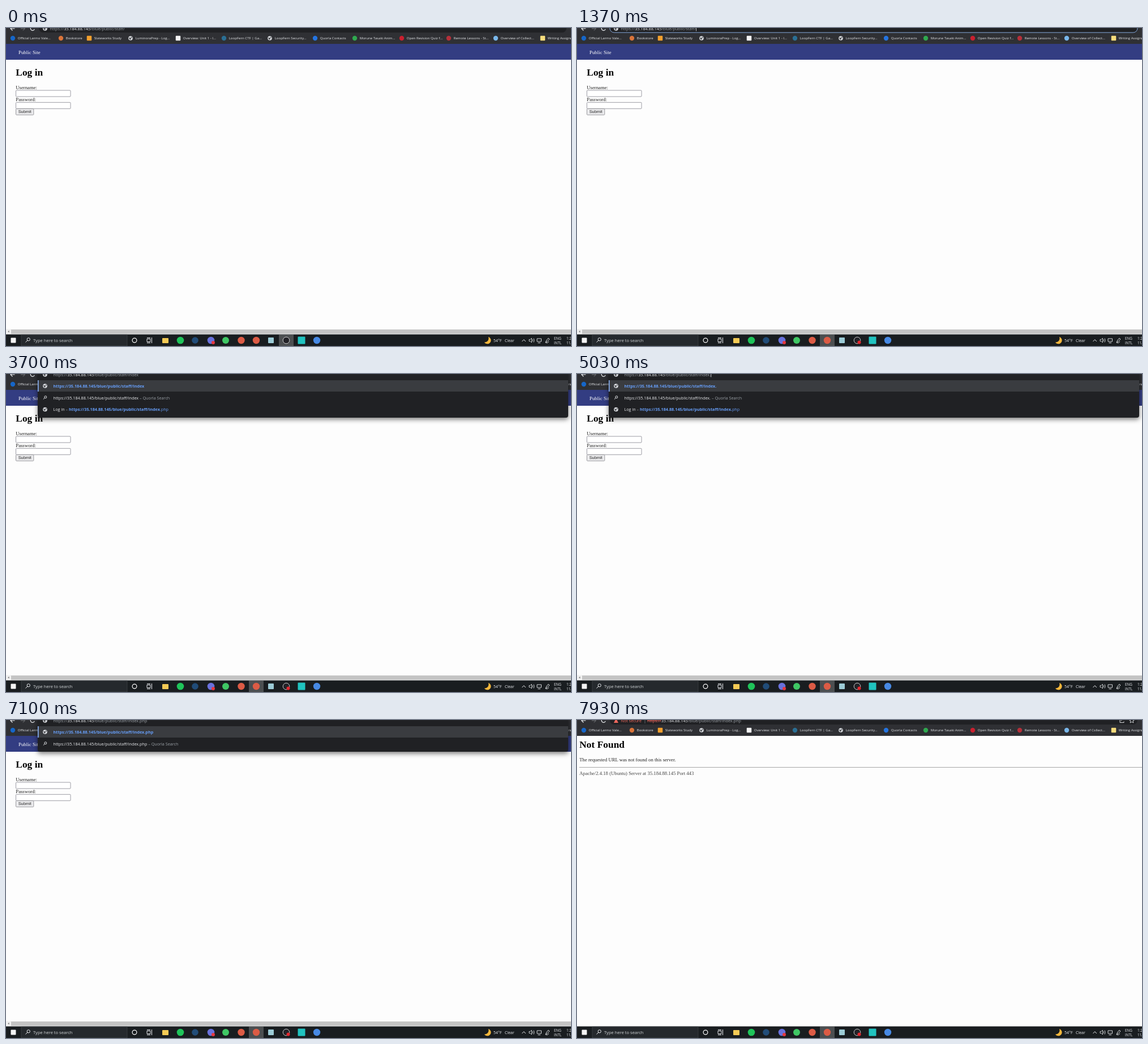
An HTML page that plays this animation: 998x561 px, repeating every 8 s.

```html
<!DOCTYPE html>
<html lang="en">
<head>
<meta charset="utf-8">
<title>Log in</title>
<style>
  html, body { margin: 0; width: 100%; height: 100%; overflow: hidden; background: #fdfdfd; }
  svg { display: block; }
  text { white-space: pre; font: 7.23px "Open Sans", "Noto Sans", sans-serif; fill: #e8eaed; }
  .mark text { font-size: 6.1px; }
  .task text { font-size: 7px; }
  .page text { font: 8.7px "Liberation Serif", Times, serif; fill: #222; }
  .page .head { font-size: 17.4px; font-weight: bold; fill: #000; }
  .grey { fill: #9aa0a6; }
  .blue { fill: #669df6; font-weight: bold; }
  .red { fill: #ee675c; }
  .line { fill: none; stroke: #e8eaed; }
</style>
</head>
<body>
<svg id="stage" width="998" height="561" viewBox="0 0 998 561"></svg>
<script>
const LOOP = 8000;
const HOST = '35.184.88.145', PATH = '/blue/public/staff/';
const ADDRESS = 'https://' + HOST + PATH;

// time at which each further character of the file name appears
const KEYS = [[1900, 'i'], [2400, 'n'], [2630, 'd'], [2900, 'e'], [3130, 'x'],
              [5000, '.'], [5770, 'p'], [6500, 'h'], [6600, 'p']];
const CARET_ON = [[870, 1630], [1900, 3700], [4200, 4800], [5000, 5570], [5770, 6300], [6500, 7000]];

const rect = (x, y, w, h, fill, more = '') =>
  `<rect x="${x}" y="${y}" width="${w}" height="${h}" fill="${fill}" ${more}/>`;
const disc = (x, y, r, fill, more = '') => `<circle cx="${x}" cy="${y}" r="${r}" fill="${fill}" ${more}/>`;
const tile = (x, y, size, fill) => rect(x - size / 2, y - size / 2, size, size, fill, 'rx="1"');
const text = (x, y, content, more = '') => `<text x="${x}" y="${y}" ${more}>${content}</text>`;
const span = (kind, content) => `<tspan class="${kind}">${content}</tspan>`;
const path = (d, more = '') => `<path class="line" d="${d}" ${more}/>`;
const group = (id, content, kind = '') => `<g id="${id}" class="${kind}">${content}</g>`;

const globe = (x, y) => disc(x, y, 3.8, '#dadce0') +
  `<path d="M${x - 3} ${y - 1}l3 0l1 2l-2 2zM${x + 1} ${y - 3}l2 2l-2 1z" fill="#4a4c50"/>`;
const lens = (x, y, s) =>
  path(`M${x - s} ${y + s}l${s} ${-s}`) + disc(x + s * .5, y - s * .5, s * .75, 'none', 'stroke="#e8eaed"');

function bookmarks() {
  const round = color => x => disc(x, 18, 4.2, color);
  const square = color => x => tile(x, 18, 8.5, color);
  const world = x => globe(x, 18);
  return [
    [12, 'Official Larmo Vale...', round('#1666c8')],
    [97, 'Bookstore', round('#d9743a')],
    [147, 'Slateworks Study', square('#f2a02e')],
    [220, 'LuminoraPrep - Log...', world],
    [304, 'Overview: Unit 1 - I...', square('#f4f4f4')],
    [385, 'LoopFern CTF | Ga...', round('#2a6f94')],
    [466, 'LoopFern Security...', world],
    [546, 'Quorla Contacts', round('#2474e0')],
    [616, 'Morune Tasaki Anim...', round('#2fa84f')],
    [699, 'Open Revision Quiz f...', round('#c9202f')],
    [782, 'Remote Lessons - St...', round('#b5303a')],
    [865, 'Overview of Collect...', round('#79b7ea')],
    [948, 'Writing Assignments', square('#f6dc7c')]
  ].map(([x, label, icon]) => icon(x) + text(x + 8.7, 20.3, label)).join('');
}

function toolbar() {
  return rect(0, 0, 998, 28, '#2f3034') +
    path('M15.500 1H8.500M11.500 -3L8 1L11.500 4.500', 'stroke-width="1.2"') +
    path('M26 1H33M30 -3L33.500 1L30 4.500', 'style="stroke:#77797d"') +
    path('M50 -1A3.600 3.600 0 1 0 50.300 2', 'stroke-width="1.2"') +
    rect(58, -7, 932, 15, '#202124', 'id="omnibox" rx="7.5"') +
    group('marks', bookmarks(), 'mark');
}

function loginPage() {
  const field = y => rect(17.5, y, 96.5, 11, '#fff', 'rx="1" stroke="#85858f" stroke-width=".8"');
  return rect(0, 28, 998, 28, '#333d82') +
    text(22, 46, 'Public Site', 'style="fill:#fff;font-size:8.9px"') +
    text(17.3, 83.5, 'Log in', 'class="head"') +
    text(17.3, 107.5, 'Username:') + field(110) +
    text(17.3, 128.8, 'Password:') + field(131.3) +
    rect(17.5, 142.5, 31.300, 10.8, '#ececee', 'rx="1" stroke="#85858a" stroke-width=".8"') +
    text(33.2, 150.4, 'Submit',
      'text-anchor="middle" style="font:7.4px \'Liberation Sans\',Arial,sans-serif"') +
    rect(0, 531, 998, 9.5, '#f1f1f1') + rect(9, 532, 989, 7.5, '#c4c4c4') +
    '<path d="M5.500 533.500v4l-2.200 -2z" fill="#777"/>';
}

function missingPage() {
  return text(4.3, 49.2, 'Not Found', 'class="head"') +
    text(4.3, 72.8, 'The requested URL was not found on this server.') +
    rect(4, 83, 994, 1, '#a5a5a5') +
    text(4.3, 96.7, 'Apache/2.4.18 (Ubuntu) Server at 35.184.88.145 Port 443', 'font-style="italic" style="fill:#444"');
}

function taskbar() {
  return rect(0, 540.5, 998, 20.5, '#191d20') +
    tile(13, 551, 9, '#f4f4f4') +
    rect(27, 541, 187, 20, '#25292d', 'stroke="#44484c" stroke-width=".7"') +
    lens(38, 551, 3.5) + text(48, 554.2, 'Type here to search', 'style="font-size:7.6px;fill:#d5d8da"') +
    rect(0, 541, 26, 20, '#fff', 'id="active" opacity=".22"') +
    disc(227, 551, 3.9, 'none', 'stroke="#fff" stroke-width="1.2"') +
    path('M249 548.500h6v5h-6zM249 546.500h6M249 555.500h6M257.500 546v10') +
    rect(276, 547, 11, 9, '#f5ca55', 'rx="1"') +
    disc(308, 551, 6.3, '#1fc45a') + disc(334, 551, 5.8, '#214c78') +
    disc(362, 551, 6.3, '#6971dc') + disc(366, 555, 3, '#e5383f') +
    disc(388, 551, 6, '#3fc764') +
    disc(415.500, 551, 6.2, '#dc5b45') + disc(442, 551, 6.2, '#dc5b45') +
    tile(468, 551, 10, '#9ccbd6') +
    disc(495, 551, 5.8, '#232328', 'stroke="#d4d4d6" stroke-width=".9"') +
    disc(498.500, 554.500, 3, '#e3262e', 'id="record"') +
    tile(522, 551, 13, '#20c3c0') + disc(549, 551, 6.2, '#4789e4') +
    '<path d="M852 545a6.300 6.300 0 1 1 -7 9.500a7 7 0 0 0 7 -9.500z" fill="#f5b73c"/>' +
    text(861, 553.9, '54°F') + text(881, 553.9, 'Clear') +
    path('M911.500 553l3.200 -3.300l3.200 3.300') +
    path('M924 549.500h2l2.500 -2.500v8l-2.500 -2.500h-2zM930 549q1.500 2 0 4M932 547.500q2.500 3.500 0 7', 'stroke-width=".8"') +
    path('M938 548h7.500v5h-7.500zM939.500 555.500h4.500', 'stroke-width=".9"') +
    path('M953 555q1 -4 5 -8l2 2q-3 4 -7 6q4 2 6 -2', 'stroke-width=".9"') +
    [[968, 549.5, 'ENG'], [968, 558.4, 'INTL'], [990, 549.5, '1:2'], [990, 558.4, '11/']]
      .map(([x, y, label]) => text(x, y, label, 'style="font-size:6.3px"')).join('');
}

function suggestions() {
  return rect(56, -8, 937, 85, '#202124', 'id="panel" rx="4" style="filter:drop-shadow(0 3px 4px #0008)"') +
    rect(56, 11, 937, 20, '#3a3c40') + rect(56, 11, 1.6, 20, '#8ab4f8') +
    globe(69, 21) + lens(68.500, 42, 2.600) +
    '<text id="go" class="blue" x="83.5" y="23.600"/><text id="find" x="83.5" y="44.600"/>' +
    group('visited', globe(69, 62.500) + '<text id="history" x="83.5" y="65.200"/>');
}

const badge = '<path d="M69 -3l4 8h-8z" fill="#ee675c"/>' +
  path('M959 0v4.500h7v-2M961 1.500q1 -3 5 -3', 'stroke-width=".9"') +
  path('M980 -3l1.400 3h3l-2.400 2l1 3l-3 -1.700l-3 1.700l1 -3l-2.400 -2h3z', 'stroke-width=".8"');

stage.innerHTML = rect(0, 0, 998, 561, '#fdfdfd') + toolbar() +
  group('login', loginPage(), 'page') + group('missing', missingPage(), 'page') +
  group('task', taskbar(), 'task') + group('drop', suggestions()) +
  group('site', globe(69, 1)) + group('warn', badge) +
  '<text id="url" y="3.800"/>' + rect(0, -4, .8, 9.5, '#e8eaed', 'id="caret"');

const el = id => document.getElementById(id);
const show = (id, on) => { el(id).style.display = on ? '' : 'none'; };
const put = (id, html) => { if (el(id).source !== html) el(id).innerHTML = el(id).source = html; };

function draw(t) {
  const name = KEYS.filter(([at]) => t >= at).map(([, key]) => key).join('');
  const open = t >= 1900 && t < 7500;
  const failed = t >= 7600;
  const focused = t >= 870 && t < 1900;
  const short = t >= 7000;

  show('drop', open);
  show('visited', !short);
  show('login', !failed);
  show('missing', failed);
  show('site', !failed);
  show('warn', failed);
  show('record', t >= 500);
  el('active').setAttribute('x', t < 300 ? 482 : 429);
  el('panel').setAttribute('height', short ? 64 : 85);
  el('omnibox').setAttribute('stroke', focused ? '#86aadf' : 'none');

  const rest = span('', HOST) + span('grey', PATH + name);
  put('url', failed
    ? span('red', 'Not secure') + '<tspan class="grey" x="118">|</tspan>' +
      '<tspan class="red" x="124" text-decoration="line-through">https://</tspan>' + rest
    : span('grey', 'https://') + rest);
  const left = open ? 83.5 : 77.5;
  el('url').setAttribute('x', left);

  put('go', ADDRESS + name);
  put('find', ADDRESS + name + span('grey', ' – Quorla Search'));
  put('history', 'Log in' + span('grey', ' – ') + span('blue', ADDRESS + name) +
    `<tspan fill="#669df6" style="fill:#669df6">${'index.php'.slice(name.length)}</tspan>`);

  const blink = CARET_ON.some(([from, to]) => t >= from && t < to);
  show('caret', blink);
  if (blink) el('caret').setAttribute('x', left + el('url').getComputedTextLength() + .3);
}

const start = performance.now();
function tick() {
  draw((performance.now() - start) % LOOP);
  requestAnimationFrame(tick);
}
tick();
</script>
</body>
</html>
```
